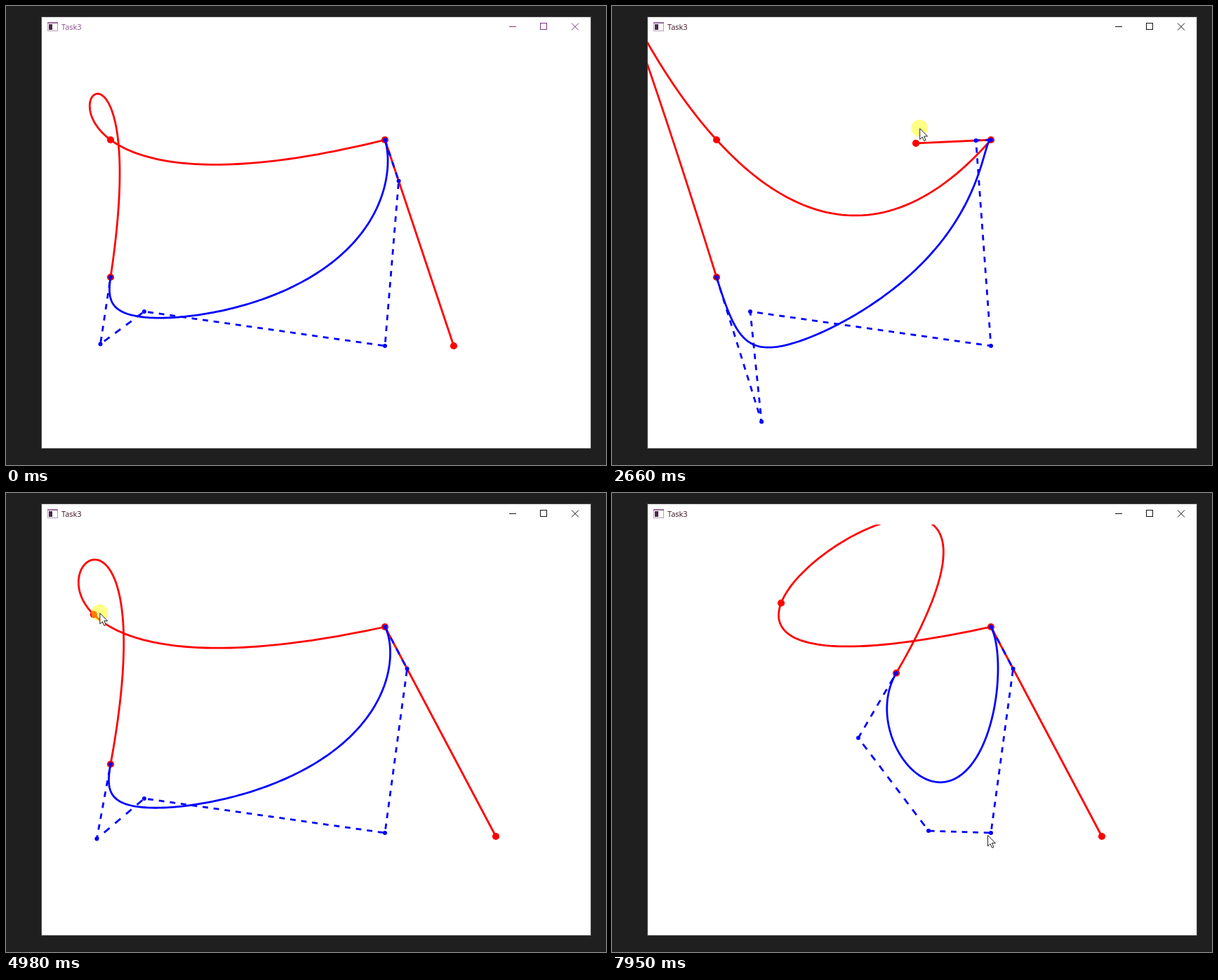
Write an HTML page with a canvas that moves like this. It is 855 by 655 pixels and loops after 8000 ms.

```html
<!DOCTYPE html>
<html lang="en">
<head>
<meta charset="utf-8">
<title>Task3</title>
<style>
  html, body { margin: 0; width: 100%; height: 100%; overflow: hidden; background: #1f1f1f; }
  canvas { display: block; }
</style>
</head>
<body>
<canvas width="855" height="655"></canvas>
<script>
const ctx = document.querySelector('canvas').getContext('2d');
const LOOP = 8000, LEAD = 30, RED = '#f00', BLUE = '#00f';
const WIN = { left: 51, top: 16, right: 833, bottom: 631, client: 45 };
const ORIGIN = [WIN.left, WIN.bottom];
const cornerC = [540, 191], cornerP = [540, 485];

// One drag per handle, passing its stops at an even pace
const drags = {
  d: { start: 460, step: 480, stops: [[638, 485], [681, 410], [705, 485], [551, 533], [420, 390], [480, 90], [716, 163], [698, 490]] },
  b: { start: 4140, step: 240, stops: [[149, 191], [171, 196], [150, 191], [105, 182], [160, 165], [241, 157]] },
  a: { start: 5560, step: 230, stops: [[149, 387], [235, 309], [310, 281], [405, 257]] },
  q: { start: 6570, step: 515, stops: [[197, 436], [340, 490], [451, 482]] }
};
const gestures = [
  { start: 40, step: 1, stops: [[700, 590]] },
  ...Object.values(drags),
  { start: 7900, step: 1, stops: [[535, 488]] }
];
const endOf = g => g.start + g.step * (g.stops.length - 1);
const clamp = (x, low, high) => Math.min(high, Math.max(low, x));

// Weighted sum of points: mix(w1, p1, w2, p2, ...)
function mix(...terms) {
  const sum = [0, 0];
  for (let i = 0; i < terms.length; i += 2) {
    sum[0] += terms[i] * terms[i + 1][0];
    sum[1] += terms[i] * terms[i + 1][1];
  }
  return sum;
}

// Catmull-Rom spline through the stops of a gesture
function follow({ start, step, stops }, t) {
  const last = stops.length - 1;
  const x = clamp((t - start) / step, 0, last);
  const i = Math.min(Math.floor(x), Math.max(0, last - 1)), u = x - i, v = 1 - u;
  const stop = k => stops[clamp(k, 0, last)];
  return mix(
    -u * v * v / 2, stop(i - 1),
    v * v * (1 + 2 * u) + u * u * v / 2, stop(i),
    u * u * (3 - 2 * u) + u * v * v / 2, stop(i + 1),
    -u * u * v / 2, stop(i + 2));
}

// The pointer eases from the end of one gesture to the start of the next
function pointerAt(t) {
  const next = gestures.findIndex(g => t < g.start);
  if (next === 0) return gestures[0].stops[0];
  const current = gestures[next < 0 ? gestures.length - 1 : next - 1];
  const end = endOf(current);
  if (next < 0 || t <= end) return follow(current, t);
  const u = (t - end) / (gestures[next].start - end), eased = u * u * (3 - 2 * u);
  return mix(1 - eased, current.stops.at(-1), eased, gestures[next].stops[0]);
}

// Cubic through a, b, c at parameters 0, 2.3, 3.5 with end tangent r
function interpolate(a, b, c, r) {
  const k2 = mix(1 / 1.44, b, -1 / 1.44, c, 1.2 / 1.44, r);
  const kA = mix(1 / 12.25, a, -1 / 12.25, c, 3.5 / 12.25, r);
  const k3 = mix(1 / 2.3, k2, -1 / 2.3, kA);
  return {
    tangent: mix(1, r, -7, kA, 12.25, k3),
    at(u) {
      const s = 3.5 * (u - 1);
      return mix(1, c, s, r, s * s, k2, s * s * (s + 1.2), k3);
    }
  };
}

function bezier(points, u) {
  while (points.length > 1)
    points = points.slice(1).map((p, i) => mix(1 - u, points[i], u, p));
  return points[0];
}

function polyline(points, color, width = 2.8) {
  ctx.strokeStyle = color;
  ctx.lineWidth = width;
  ctx.beginPath();
  points.forEach(p => ctx.lineTo(...p));
  ctx.stroke();
}

function curve(at, color) {
  polyline(Array.from({ length: 161 }, (_, i) => at(i / 160)), color);
}

// Stipple is measured along the longer axis and runs on across corners
function dashed(points, color) {
  let phase = 0;
  for (let i = 1; i < points.length; i++) {
    const [dx, dy] = mix(1, points[i], -1, points[i - 1]);
    const major = Math.max(Math.abs(dx), Math.abs(dy), 0.01);
    const scale = Math.hypot(dx, dy) / major;
    ctx.setLineDash([7.8 * scale, 7.8 * scale]);
    ctx.lineDashOffset = phase * scale;
    polyline([points[i - 1], points[i]], color);
    phase += major;
  }
  ctx.setLineDash([]);
}

function dot([x, y], radius, color) {
  ctx.fillStyle = color;
  ctx.beginPath();
  ctx.arc(x, y, radius, 0, 2 * Math.PI);
  ctx.fill();
}

function drawWindow(active) {
  const width = WIN.right - WIN.left, height = WIN.bottom - WIN.top;
  ctx.fillStyle = '#1f1f1f';
  ctx.fillRect(0, 0, 855, 655);
  ctx.fillStyle = '#4c4c4c';
  ctx.fillRect(WIN.left - 1, WIN.top - 1, width + 2, height + 2);
  ctx.fillStyle = '#fff';
  ctx.fillRect(WIN.left, WIN.top, width, height);

  ctx.strokeStyle = '#b79bb7';
  ctx.lineWidth = 1;
  ctx.strokeRect(59.5, 23.5, 14, 12);
  ctx.fillStyle = '#9a6a9a';
  ctx.fillRect(59, 23, 15, 2);
  ctx.fillStyle = '#4a2a4a';
  ctx.fillRect(61, 26, 5, 8);

  ctx.fillStyle = active ? '#3a1020' : '#8a4a8a';
  ctx.font = '11px "Open Sans", sans-serif';
  ctx.fillText('Task3', 79, 34);

  const ink = active ? '#111' : '#803080';
  polyline([[717, 29.5], [727, 29.5]], ink, 1);
  ctx.strokeRect(761.5, 24.5, 9, 9);
  polyline([[806, 24.5], [816, 34.5]], ink, 1);
  polyline([[816, 24.5], [806, 34.5]], ink, 1);
}

function drawCurves(t) {
  const [d, b, a, q] = Object.values(drags).map(drag => follow(drag, t));
  const c = cornerC;
  const red = interpolate(a, b, c, mix(1, d, -1, ORIGIN));
  const control = [c, mix(0.8, c, 0.2, d), cornerP, q, mix(1, a, -0.2, red.tangent), a];

  ctx.save();
  ctx.beginPath();
  ctx.rect(WIN.left, WIN.client, WIN.right - WIN.left, WIN.bottom - WIN.client);
  ctx.clip();
  ctx.lineJoin = 'round';
  curve(red.at, RED);
  polyline([c, d], RED);
  [a, b, c, d].forEach(p => dot(p, 5.1, RED));
  curve(u => bezier(control, u), BLUE);
  dashed(control, BLUE);
  control.forEach(p => dot(p, 3, BLUE));
  ctx.restore();
}

function drawPointer(t) {
  if (t < gestures[0].start) return;
  const tip = pointerAt(t + LEAD);
  const pressed = Object.values(drags).some(g => t >= g.start && t <= endOf(g));
  if (pressed) dot(tip, 12, 'rgba(255,255,0,.48)');
  ctx.save();
  ctx.translate(...tip);
  ctx.fillStyle = '#fff';
  ctx.strokeStyle = '#222';
  ctx.lineWidth = 1;
  const arrow = new Path2D('M.5 .5V16L4 12.6 6.6 18.3 9 17.2 6.5 11.6H11.4Z');
  ctx.fill(arrow);
  ctx.stroke(arrow);
  ctx.restore();
}

function frame() {
  const t = performance.now() % LOOP;
  drawWindow(t >= drags.d.start);
  drawCurves(t);
  drawPointer(t);
  requestAnimationFrame(frame);
}
frame();
</script>
</body>
</html>
```
